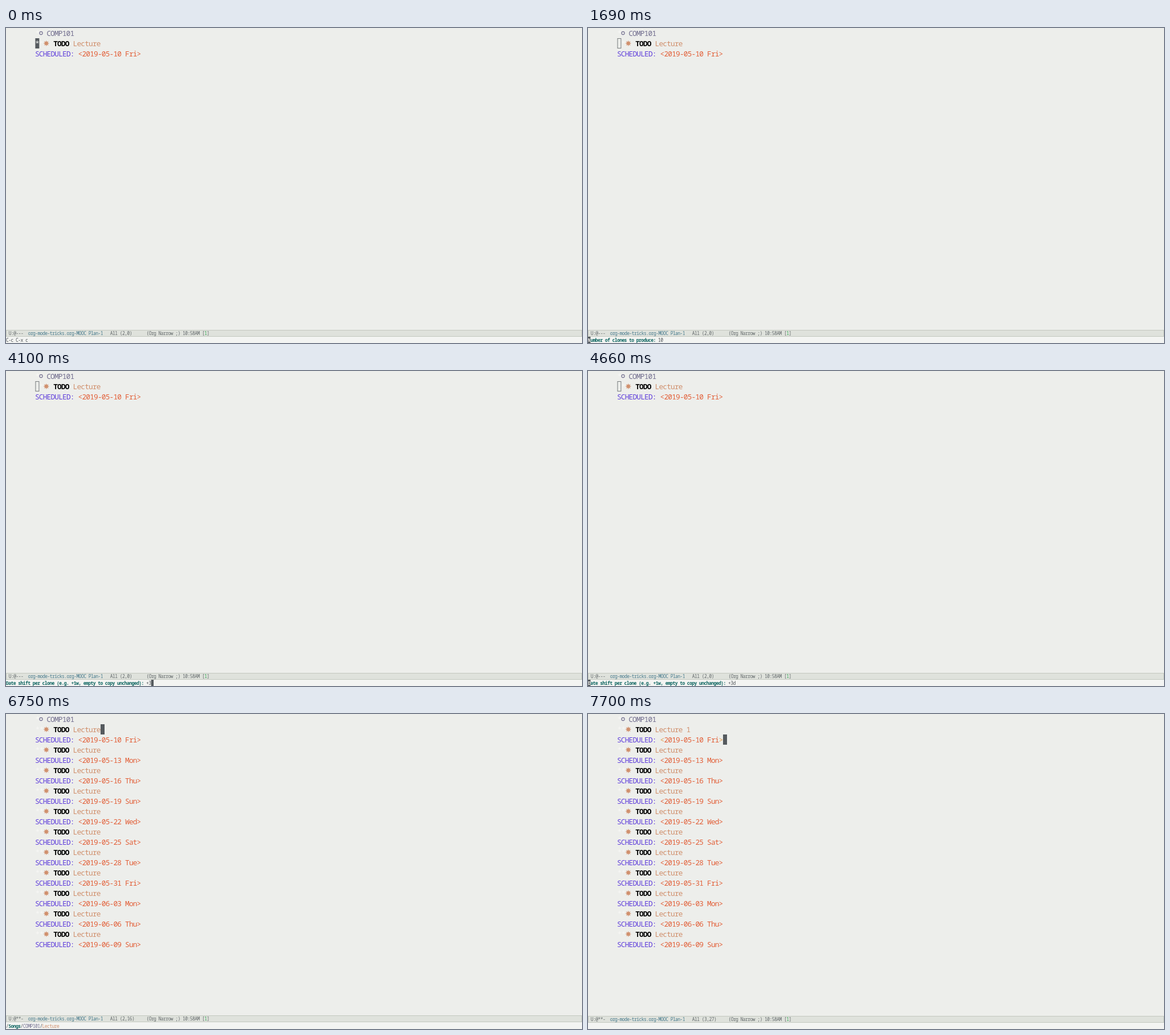
Recreate the animation shown at these times as an HTML page with a canvas. Size 1011 by 554 pixels, loop 8000 ms.

```html
<!DOCTYPE html>
<html lang="en">
<head>
<meta charset="utf-8">
<title>Cloning scheduled headings</title>
<style>
  html, body { margin: 0; width: 100%; height: 100%; overflow: hidden; background: #edeeeb; }
  canvas { display: block; }
</style>
</head>
<body>
<canvas id="stage" width="1011" height="554"></canvas>
<script>
const ctx = document.getElementById('stage').getContext('2d');
const LOOP = 8000, LEFT = 51.4, ROW = 18;
const BIG = { size: 12.8, cell: 6.87 }, SMALL = { size: 8, cell: 4.24 };
const C = {
  page: '#edeeeb', bar: '#dfe2dc', edge: '#c3c8bf', echo: '#f3f4f2',
  cursor: '#555a5e', hidden: '#f7f7f5', course: '#706c8d', lecture: '#d08f6c',
  key: '#6140db', date: '#e25f38', match: '#e39a45', prompt: '#0b645f',
  text: '#4c5156', mode: '#62686a', file: '#45798c', green: '#32a852'
};
const CLONES = 'Number of clones to produce: ';
const SHIFT = 'Date shift per clone (e.g. +1w, empty to copy unchanged): ';

// Each state holds until the next one: point is [line, column, x].
const states = [
  { at: 0, echo: [['C-c C-x c', C.text]] },
  { at: 610, prompt: CLONES, input: '1' },
  { at: 750, prompt: CLONES, input: '10' },
  { at: 1690, prompt: CLONES, input: '10', home: true },
  { at: 3310, prompt: SHIFT, input: '+' },
  { at: 4100, prompt: SHIFT, input: '+3' },
  { at: 4320, prompt: SHIFT, input: '+3d' },
  { at: 4660, prompt: SHIFT, input: '+3d', home: true },
  { at: 5870, echo: [['Creating LaTeX previews in buffer... done.', C.text]] },
  { at: 6750, point: [2, 16, 166], lift: 1, echo: [['/', C.text], ['Songs', C.prompt, 700],
      ['/', C.text], ['COMP101', C.course], ['/', C.text], ['Lecture', C.lecture]] },
  { at: 7030, point: [2, 17, 173] },
  { at: 7390, point: [2, 18, 180], title: 'Lecture 1' },
  { at: 7460, point: [3, 18, 175], title: 'Lecture 1', under: '-' },
  { at: 7700, point: [3, 27, 237], title: 'Lecture 1', match: true }
];

function rect(x, y, w, h, color) {
  ctx.fillStyle = color;
  ctx.fillRect(x, y, w, h);
}

// Sets text on a fixed character grid and returns the x after it.
function type(text, x, y, color, face = BIG, weight = 400) {
  ctx.font = `${weight} ${face.size}px "Noto Sans Mono", monospace`;
  ctx.textAlign = 'center';
  ctx.fillStyle = color;
  for (const ch of text) {
    ctx.fillText(ch, x + face.cell / 2, y);
    x += face.cell;
  }
  return x;
}

function typeRuns(runs, x, y) {
  for (const [text, color, weight] of runs) x = type(text, x, y, color, SMALL, weight);
  return x;
}

function bullet(x, y) {
  ctx.beginPath();
  for (let i = 0; i < 16; i++) {
    const r = i % 2 ? 2.7 : 5.3, a = i * Math.PI / 8;
    ctx.lineTo(x + r * Math.sin(a), y - r * Math.cos(a));
  }
  ctx.fillStyle = C.lecture;
  ctx.fill();
}

function heading(y, title) {
  type('**', 52, y + 14, C.hidden);
  bullet(70.8, y + 9);
  type('TODO', 83.6, y + 14, '#000', BIG, 700);
  type(title, 118, y + 14, C.lecture);
}

function schedule(y, index, match) {
  const day = new Date(Date.UTC(2019, 4, 10 + 3 * index));
  const name = day.toUTCString().slice(0, 3);
  const bracket = match ? C.match : C.date;
  let x = type('SCHEDULED: ', LEFT, y + 14, C.key);
  x = type('<', x, y + 14, bracket);
  x = type(`${day.toISOString().slice(0, 10)} ${name}`, x, y + 14, C.date);
  type('>', x, y + 14, bracket);
}

function drawBuffer(s, cloned) {
  type('*', 52, 14, C.hidden);
  ctx.beginPath();
  ctx.arc(61.5, 9, 2.6, 0, 7);
  ctx.strokeStyle = C.course;
  ctx.lineWidth = 1.1;
  ctx.stroke();
  type('COMP101', 71.6, 14, C.course);
  for (let i = 0; i < (cloned ? 11 : 1); i++) {
    const y = ROW * (1 + 2 * i);
    heading(y, i ? 'Lecture' : s.title || 'Lecture');
    schedule(y + ROW, i, !i && s.match);
  }
}

function drawPoint(s) {
  const [line, , x] = s.point || [2, 0, LEFT];
  const y = (line - 1) * ROW;
  if (s.prompt) {
    rect(x, y, 7, ROW, C.page);
    ctx.lineWidth = 1;
    ctx.strokeStyle = '#777b7d';
    ctx.strokeRect(x + .5, y + .5, 6, ROW - 1);
  } else {
    rect(x, y, 7, ROW, C.cursor);
    const under = s.point ? s.under : '*';
    if (under) type(under, x, y + 14, C.page);
  }
}

function drawModeLine(s, cloned) {
  const y = 531 - (s.lift || 0);
  rect(0, y, 1011, 12, C.bar);
  ctx.lineWidth = 1;
  ctx.strokeStyle = C.edge;
  ctx.strokeRect(.5, y + .5, 1010, 11);
  const [line, column] = s.point || [2, 0];
  const place = `   All (${line},${column})`.padEnd(18);
  typeRuns([
    [cloned ? 'U:@**-  ' : 'U:@---  ', C.mode],
    ['org-mode-tricks.org-MOOC Plan-1', C.file],
    [place + '(Org Narrow ;) 10:58AM [', C.mode],
    ['1', C.green], [']', C.mode]
  ], 5, y + 9);
}

function drawEcho(s) {
  const top = 543 - (s.lift || 0), y = 551.5;
  rect(0, top, 1011, 554 - top, C.echo);
  if (!s.prompt) return typeRuns(s.echo || [], .3, y);
  const end = typeRuns([[s.prompt, C.prompt, 700], [s.input, C.text]], .3, y);
  rect(s.home ? 0 : end, 543, 4.4, 11, C.cursor);
  if (s.home) type(s.prompt[0], .3, y, C.page, SMALL, 700);
}

function frame(now) {
  const t = now % LOOP;
  const s = states.findLast(state => state.at <= t) || states[0];
  const cloned = t >= 5870;
  rect(0, 0, 1011, 554, C.page);
  drawBuffer(s, cloned);
  drawPoint(s);
  drawModeLine(s, cloned);
  drawEcho(s);
  requestAnimationFrame(frame);
}
frame(performance.now());
</script>
</body>
</html>
```
